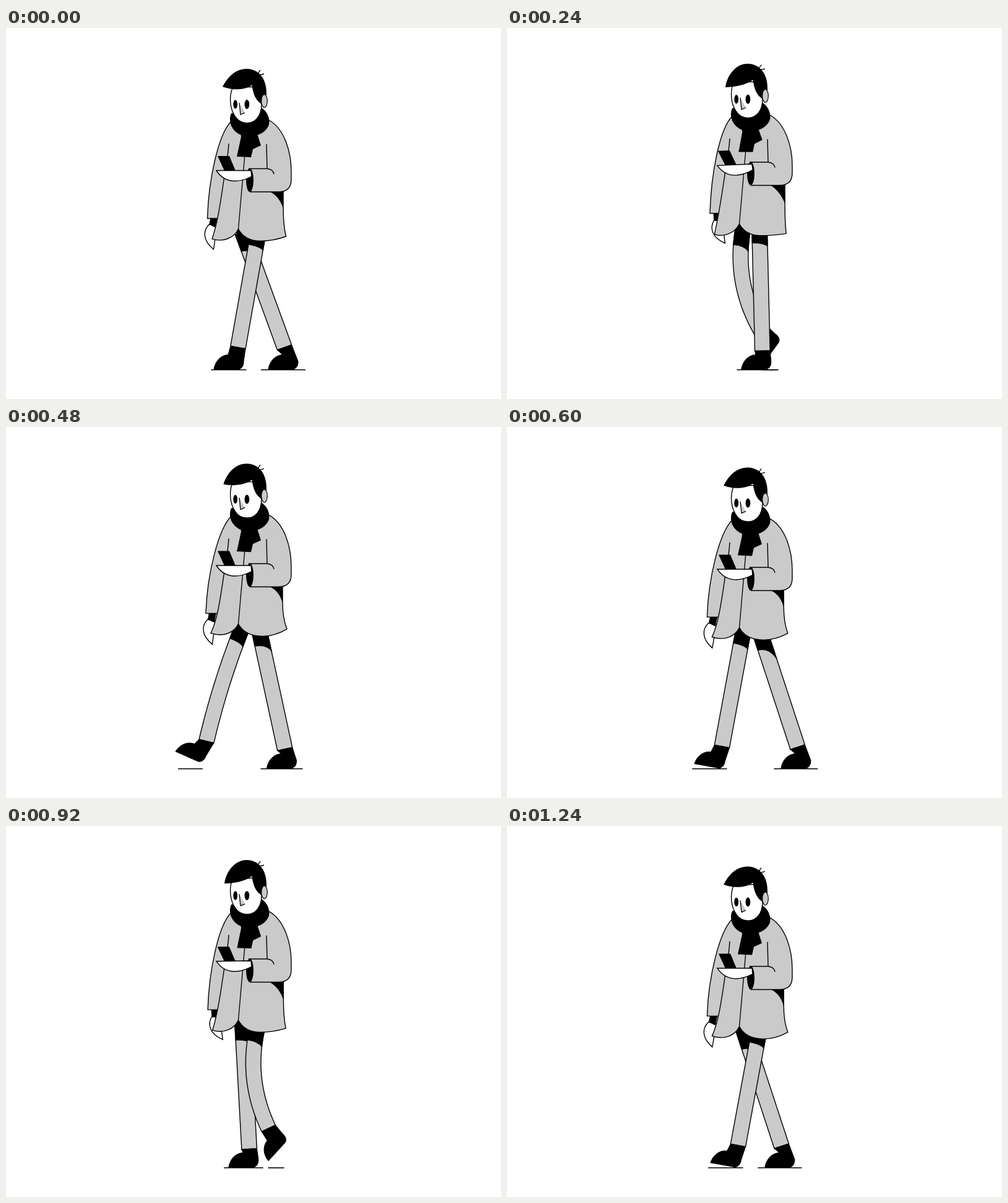
An HTML page with a canvas that plays this animation: 800 by 600 pixels, repeating every 1280 ms.

```html
<!DOCTYPE html>
<html lang="en">
<head>
<meta charset="utf-8">
<title>Walking</title>
<style>
html, body { margin: 0; width: 100%; height: 100%; overflow: hidden; background: #fff; }
canvas { display: block; width: 800px; height: 600px; }
</style>
</head>
<body>
<canvas id="stage" width="800" height="600"></canvas>
<script>
const ctx = document.getElementById('stage').getContext('2d');
const LOOP = 1280, STEP = 40, RAD = Math.PI / 180;
const GRAY = '#cacaca', INK = '#000', PAPER = '#fff';

const mix = (a, b, k) => a + (b - a) * k;
const smooth = (a, b, x) => {
  const k = Math.min(1, Math.max(0, (x - a) / (b - a)));
  return k * k * (3 - 2 * k);
};
// eases up from a to b, holds, eases down from c to d
const bump = (x, a, b, c, d) => smooth(a, b, x) * (1 - smooth(c, d, x));

function draw(d, fill, line) {
  const path = new Path2D(d);
  if (fill) { ctx.fillStyle = fill; ctx.fill(path); }
  if (line) { ctx.strokeStyle = INK; ctx.lineWidth = line; ctx.stroke(path); }
}

function oval(x, y, rx, ry, fill, line) {
  draw(`M${x - rx} ${y}a${rx} ${ry} 0 1 0 ${2 * rx} 0a${rx} ${ry} 0 1 0 ${-2 * rx} 0Z`, fill, line);
}

function group(fn, dy, angle = 0, x = 0, y = 0) {
  ctx.save();
  ctx.translate(x, y + dy);
  ctx.rotate(angle * RAD);
  ctx.translate(-x, -y);
  fn();
  ctx.restore();
}

const poly = pts => 'M' + pts.map(p => p.join(' ')).join('L');

// foot planted and sliding back with the ground
function stance(p) {
  return {
    ax: mix(375, 476, p), ay: 516.5 + 6 * Math.sin(Math.PI * p),
    turn: 0, bend: 0, reach: 39 - 13 * p, back: p, ground: mix(28.5, 36, p)
  };
}

// heel peels off, foot swings forward, then lands heel first
function swing(u) {
  const land = 0.75, v = Math.min(1, u / land), w = Math.max(0, (u - land) / (1 - land));
  return {
    ax: 476 - 126 * v ** 1.65 + 25 * (1 - (1 - w) ** 2),
    ay: 516.5 - 28 * bump(u, 0, 0.28, 0.4, 0.95),
    turn: 24 * bump(u, 0.6, 0.75, 0.86, 1) - 55 * bump(u, 0, 0.25, 0.34, 0.76),
    bend: 31 * bump(u, 0, 0.27, 0.42, 0.9),
    reach: 39 - 13 * Math.max(0, 1 - 8 * u),
    back: 1 - u,
    ground: mix(mix(36, 28.5, u), 13, bump(u, 0, 0.26, 0.56, 1))
  };
}

function leg(phase, shift, bob) {
  const { ax, ay, turn, bend, reach, back, ground } = phase < 1 ? stance(phase) : swing(phase - 1);
  const hx = 408, hy = 330 + bob, r = 12.3;
  const len = Math.hypot(ax - hx, ay - hy);
  const cx = (hx + ax) / 2 - bend * (ay - hy) / len;
  const cy = (hy + ay) / 2 + bend * (ax - hx) / len;
  const c = Math.cos(turn * RAD), s = Math.sin(turn * RAD);
  const toeX = ax - reach * c - 35.5 * s;
  const toeY = phase < 1 ? 552 : ay - reach * s + 35.5 * c;

  // point at parameter u, pushed sideways by a half width
  const edge = (u, side) => {
    const q = 1 - u;
    const dx = q * (cx - hx) + u * (ax - cx), dy = q * (cy - hy) + u * (ay - cy);
    const l = Math.hypot(dx, dy);
    return [
      q * q * hx + 2 * q * u * cx + u * u * ax + side * r * dy / l,
      q * q * hy + 2 * q * u * cy + u * u * ay - side * r * dx / l
    ];
  };
  const run = (side, a, b) => Array.from({ length: 21 }, (_, i) => edge(mix(a, b, i / 20), side));

  ctx.save();
  ctx.translate(shift, 0);
  const mid = toeX + 24 * c + 5 * s;
  draw(`M${mid - ground} 552.8H${mid + ground}`, null, 1.6);
  draw(poly([...run(-1, 0, 1), ...run(1, 1, 0)]) + 'Z', GRAY, 1.4);

  // shadow cast by the coat
  const depth = 25 + 17 * back ** 1.6, skew = 5 + 21 * back ** 3.5;
  const ul = (depth - skew / 2) / len, ur = (depth + skew / 2) / len;
  const [mx, my] = edge(ul, 0.45), [rx, ry] = edge(ur, 1);
  draw(poly(run(-1, 0, ul)) + `Q${mx} ${my} ${rx} ${ry}L` + poly(run(1, ur, 0)).slice(1) + 'Z', INK, 1.2);
  draw(`M${hx - r} ${hy + 2}V${hy - 14}H${hx + r}V${hy + 2}Z`, INK);

  const f = (x, y) => `${toeX + x * c - y * s} ${toeY + x * s + y * c}`;
  draw(`M${f(0, 0)}C${f(2, -13)} ${f(11, -23)} ${f(23, -23.5)}L${edge(1, -1).join(' ')}` +
    `L${edge(1, 1).join(' ')}L${f(48, -13)}C${f(48.5, -5)} ${f(44, 0)} ${f(39, 0)}Z`, INK, 1);
  ctx.restore();
}

function farHand() {
  draw('M-8 12C-18 22 -18 38 0 52L5 14Z', PAPER, 1.4);
  draw('M-6 1L6 1 3 17 -8 12Z', INK);
}

function coat(arm, flare, cuff) {
  draw(`M364 151C343 172 ${cuff + 2} 245 ${cuff} 308H345L365 200Z`, GRAY, 1.4);

  const right = 450 - 3 * flare, corner = 450 + 4 * flare, hem = 343.5 - 10 * flare;
  const left = 337 - 6 * flare, low = 343.5 + 1.5 * flare;
  const rim = `C359 205 355 228 352 246C347 280 342 ${310 + 8 * flare} ${left} ${343 - 3 * flare}` +
    `C352 347 369 339 375.5 325C382 337 394 ${low} ${405 + 10 * flare} ${low}` +
    `Q${430 + 4 * flare} ${low} ${corner} ${hem}C${right + 3 * flare} ${hem - 10} ${right} 308 ${right} 290V262`;
  draw(`M364 151L360 187${rim}L425 149Z`, GRAY);
  draw(`M360 187${rim}`, null, 1.4);
  draw('M386 204L375.5 325', null, 1.3);

  draw(`M424 ${264 + arm}C436 268 444 279 ${right} 292V${262 + arm}Z`, INK);
  const top = 227.5 + arm, end = 265 + arm;
  const outer = `M425 149C450 163 461 200 461 ${233 + arm}V${245 + arm}C461 ${259 + arm} 453 ${end} 440 ${end}H394`;
  draw(`${outer}V${top}H422L418 149Z`, GRAY);
  draw(outer, null, 1.4);
  draw(`M421 188L422 ${top}M392 ${top}H422Q432 ${top + 1} 433 ${top + 9}`, null, 1.4);
  oval(394, 246 + arm, 6, 19, INK);
}

function phoneHand() {
  draw('M342 207H361L371 231H353Z', INK);
  draw('M340 230.5H396L397 240C380 249 355 254 340 230.5Z', PAPER, 1.4);
}

function head(lift, drag) {
  group(() => draw('M379 168L380 176 373 208 396 209 399 196 412 190 405 168Z', INK), 0, -4 * drag, 392, 170);
  draw('M364 138C358 152 366 168 380 173C398 179 420 172 425 156C427 146 422 135 413 129Z', INK);
  draw('M366 97C360 112 362 132 371 144C379 156 397 157 406 146C412 139 413 130 413 123L400 95Z', PAPER, 1.4);
  const x = 350 + 3 * lift, y = 95 + 9 * lift;
  draw(`M${x} ${y}C${358 - 2 * lift} ${80 + 4 * lift} 370 66 389 66C408 66 422 82 421 108L413 123` +
    `C404 118 399 106 397.5 92C386 101 366 ${101 + 3 * lift} ${x} ${y}Z`, INK);
  draw(`M407 76Q${408 - drag} 71 ${411 + drag} 68M408 77Q412 ${75.5 - 2 * drag} 417 ${74 + drag}`, null, 1.4);
  oval(417.5, 118, 4.8, 10.5, GRAY, 1.2);
  oval(370.7, 123.5, 3.4, 7.2, INK);
  oval(389.4, 123.5, 3.9, 7.4, INK);
  draw('M377 121L379 140 386 137Z', GRAY);
  draw('M377 121L379 140 386 137', null, 1.3);
}

function render(time) {
  const stride = time / LOOP * 2;           // 0..1 near foot planted, 1..2 swinging
  const p = stride % 1, q = (p + 0.1) % 1;  // the upper body repeats every step
  const bob = -12.5 * bump(p, 0.15, 0.52, 0.52, 1);
  const armBob = -13 * bump(p, 0.1, 0.48, 0.5, 1);
  const lift = bump(p, 0, 0.4, 0.48, 1);
  const drag = bump(p, 0, 0.2, 0.25, 0.5);
  const flare = 1 - bump(q, 0, 0.25, 0.35, 0.7);
  const handAngle = 3 - 18 * bump(q, 0.05, 0.3, 0.5, 0.95);
  const cuff = 330 - 7 * flare;

  ctx.fillStyle = PAPER;
  ctx.fillRect(0, 0, 800, 600);
  leg((stride + 1) % 2, -26, bob);
  leg(stride, 0, bob);
  ctx.save();
  ctx.translate(cuff + 11, 306 + bob);
  ctx.rotate(handAngle * RAD);
  farHand();
  ctx.restore();
  group(() => coat(armBob - bob, flare, cuff), bob);
  group(phoneHand, armBob, -5 * drag, 396, 235);
  group(() => head(lift, drag), bob);
}

function tick() {
  const t = performance.now() % LOOP;
  render(Math.floor(t / STEP) * STEP);
  requestAnimationFrame(tick);
}
tick();
</script>
</body>
</html>
```
